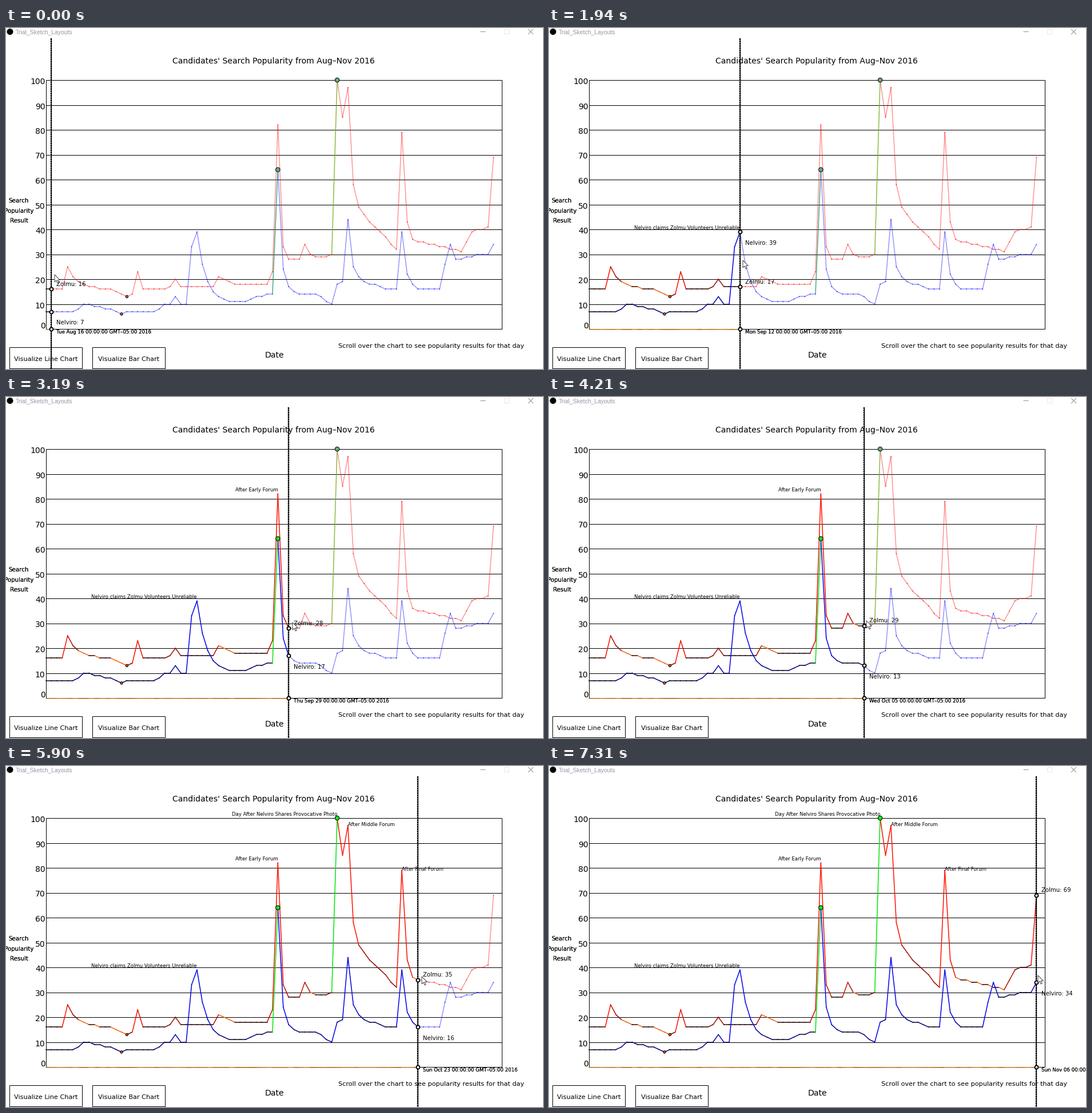
These frames come from a looping animation (939 px wide and 596 px high, 7630 ms). A matplotlib script:

```python
import numpy as np
import matplotlib.pyplot as plt
from matplotlib.animation import FuncAnimation
from matplotlib.collections import LineCollection
from matplotlib.patches import Circle, Polygon, Rectangle

W, H, DPI = 939, 596, 64
PT = 72 / DPI                      # points per pixel
FRAMES, INTERVAL = 218, 35
STEP_MS, LAST_STEP = 77.75, 94
LEFT, RIGHT, TOP, BASE = 70, 867, 91, 526
COUNT, DX, DY = 84, 9.427, 4.35
NAME_A, NAME_B = "Zolmu", "Nelviro"
days = np.arange(COUNT)
xs = LEFT + DX * days


def series(level, spikes):
    """Piecewise linear interest plus sudden spikes that decay by a rate."""
    v = np.interp(days, *zip(*level))
    for day, peak, *rate in spikes:
        decay = (rate[0] if rate else 0.0) ** np.arange(COUNT - day)
        v[day:] += (peak - v[day]) * decay
    return np.round(v).astype(int)


red_vals = series(
    [(0, 16), (12, 16), (15, 13), (18, 16), (28, 17), (41, 18), (43, 27.5),
     (53, 29.5), (57, 50), (65, 32), (69, 35), (77, 31), (79, 39), (82, 41)],
    [(4, 25, 0.6), (17, 23), (24, 20), (32, 21, 0.6), (43, 82, 0.1),
     (48, 34, 0.3), (54, 100), (55, 85), (56, 97, 0.15), (66, 79, 0.2),
     (83, 69)])
blue_vals = series(
    [(5, 7), (7, 10), (14, 7), (20, 7), (22, 10), (35, 10), (43, 15),
     (50, 14), (53, 10), (54, 18), (58, 20), (63, 16), (73, 16), (74, 26),
     (80, 30)],
    [(14, 6), (24, 13), (27, 33), (28, 39, 0.56), (43, 64, 0.195),
     (56, 44, 0.2), (66, 39, 0.27), (75, 34, 0.1), (83, 34)])
red_y, blue_y = BASE - DY * red_vals, BASE - DY * blue_vals

PATH = [(0, 85, 431), (2, 86, 432), (16, 241, 419), (25, 339, 406),
        (41, 501, 394), (49, 555, 393), (54, 555, 391), (76, 727, 368),
        (83, 802, 367), (92, 855, 366)]
path_n, path_x, path_y = zip(*PATH)

plt.rcParams["font.family"] = "DejaVu Sans"
fig = plt.figure(figsize=(W / DPI, H / DPI), dpi=DPI, facecolor="white")
ax = fig.add_axes([0, 0, 1, 1])
ax.set_xlim(0, W)
ax.set_ylim(H, 0)
ax.axis("off")


def label(x, y, text, size, ha="left", color="black", z=6, **kw):
    return ax.text(x, y, text, fontsize=size * PT, ha=ha, va="baseline",
                   color=color, zorder=z, **kw)


def box(x0, y0, x1, y1, color="black"):
    ax.add_patch(Rectangle((x0, y0), x1 - x0, y1 - y0, fill=False, ec=color,
                           lw=PT, zorder=2))


def lines(segs, color="black", width=1.0, z=2, **kw):
    return ax.add_collection(LineCollection(
        segs, colors=color, linewidths=width * PT, zorder=z, **kw),
        autolim=False)


def dots(x, y, size, face, edge="none", width=0.0, z=5):
    return ax.scatter(x, y, s=(np.array(size) * PT) ** 2, c=face,
                      edgecolors=edge, linewidths=width * PT, zorder=z)


def chain(y):
    pts = np.column_stack([xs, y])
    return np.stack([pts[:-1], pts[1:]], axis=1)


def draw_window():
    ax.add_patch(Circle((7, 6.5), 5.5, fc="black", lw=0))
    label(17, 11, "Trial_Sketch_Layouts", 10.4, color="#9c94a6",
          family="Liberation Sans")
    lines([[(829, 6), (838, 6)]], "#8f8f93")
    box(871, 2, 879, 10, "#f1e3ea")
    lines([[(913, 2), (922, 11)], [(913, 11), (922, 2)]], "#8f8f93")


def draw_chart():
    label(468, 62, "Candidates' Search Popularity from Aug\u2013Nov 2016",
          14.03, "center")
    label(469, 576, "Date", 14, "center")
    label(581, 559, "Scroll over the chart to see popularity results "
          "for that day", 11.2)
    for word, y in (("Search", 305), ("Popularity", 323), ("Result", 340)):
        for _ in range(2):
            label(22.5, y, word, 10.3, "center")
    for x, kind in ((6, "Line"), (151, "Bar")):
        box(x, 558, x + 127, 595)
        label(x + 63.5, 582, f"Visualize {kind} Chart", 11.2, "center")
    box(LEFT, TOP, RIGHT, BASE)
    levels = np.arange(0, 101, 10)
    lines([[(LEFT, BASE - DY * v), (RIGHT, BASE - DY * v)] for v in levels])
    for v in levels:
        y = BASE - DY * v + 7 if v else 525
        label(68.5, y, str(v), 14, "right")


def trail_colors(vals, hue, reach):
    """Opaque colours: near black when flat, full hue on steep changes."""
    power = np.minimum(1, np.sqrt(np.abs(np.diff(vals)) / reach))
    level = (30 + 225 * power) / 255
    out = np.ones((COUNT - 1, 4))
    out[:, :3] = level[:, None] * np.array(hue)
    return out


draw_window()
draw_chart()

# Extremes: two peaks, then two lows
ext_idx = np.array([blue_vals.argmax(), red_vals.argmax(),
                    blue_vals.argmin(), red_vals.argmin()])
ext_y = [blue_y.max(), red_y.max()]
ext_y = [blue_y.min(), red_y.min()] + ext_y
ext_on = np.repeat([(0.05, 0.9, 0.1), (0.9, 0.3, 0.1)], 2, axis=0)
ext_off = np.repeat([(0.39, 0.67, 0.51), (0.78, 0.35, 0.42)], 2, axis=0)
extremes = dots(xs[ext_idx], ext_y, [7.5, 7.5, 4.4, 4.4], ext_off, "black", 1, 4)

# The climb to each peak is green, gentle red falls are orange
GREEN = (0, 0.9, 0.05, 1)
blue_climb, red_climb = ext_idx[:2] - 1
red_on = trail_colors(red_vals, (1, 0.06, 0), 9)
red_on[np.diff(red_vals) == -1] = (0.93, 0.4, 0.08, 1)
red_on[red_climb] = GREEN
blue_on = trail_colors(blue_vals, (0, 0, 0.92), 5)
blue_on[blue_climb] = GREEN
red_off = np.tile((1, 0, 0, 0.42), (COUNT - 1, 1))
red_off[red_climb] = (0.48, 0.68, 0.12, 0.85)
blue_off = np.tile((0, 0, 1, 0.42), (COUNT - 1, 1))
blue_off[blue_climb] = (0.1, 0.58, 0.4, 0.8)

rng = np.random.default_rng(16)
mix = rng.random((COUNT - 1, 1))
base_on = (1 - mix) * (0.95, 0.66, 0.36, 1) + mix * (0.8, 0.5, 0.12, 1)
base_off = np.zeros((COUNT - 1, 4))

dots(xs, red_y, 1.7, "#f04848", z=2.5)
dots(xs, blue_y, 1.7, "#5050f0", z=2.5)
trails = [(lines(chain(y), "black", 1.5, 3, capstyle="round"), on, off)
          for y, on, off in ((red_y, red_on, red_off),
                             (blue_y, blue_on, blue_off),
                             (np.full(COUNT, BASE + 0.5), base_on, base_off))]

events = []
for day, y, ha, text in (
        (28, blue_y[28] - 4, "right",
         f"{NAME_B} claims {NAME_A} Volunteers Unreliable"),
        (43, red_y[43] - 4, "right", "After Early Forum"),
        (54, red_y[54] - 4, "right",
         f"Day After {NAME_B} Shares Provocative Photo"),
        (56, red_y[56] + 1, "left", "After Middle Forum"),
        (66, red_y[66] + 1, "left", "After Final Forum")):
    events.append((day, label(xs[day], y, text, 8.5, ha)))

ruler, = ax.plot([0, 0], [18, H], color="black", lw=2.4 * PT, zorder=7,
                 ls=(0, (1.25, 0.4)), dash_capstyle="butt")
core, = ax.plot([0, 0], [18, H], color="black", lw=PT, zorder=7)
rings = dots([0] * 3, [0] * 3, 6, "white", "black", 1.9, 8)
tag_a = label(0, 0, "", 10.1, z=9)
tag_b = label(0, 0, "", 10.1, z=9)
stamps = [label(0, 534, "", 8.6, z=9) for _ in range(2)]

ARROW = np.array([(0, 0), (0, 13), (3, 10.2), (5.2, 15), (7.2, 14.1),
                  (5.1, 9.6), (9.4, 9.6)])
pointer = ax.add_patch(Polygon(ARROW, closed=True, fc="white", ec="#333333",
                               lw=0.9 * PT, zorder=10))


def day_text(i):
    day = 15 + i
    for month, length in (("Aug", 31), ("Sep", 30), ("Oct", 31), ("Nov", 30)):
        if day <= length:
            break
        day -= length
    week = ("Mon", "Tue", "Wed", "Thu", "Fri", "Sat", "Sun")[i % 7]
    return f"{week} {month} {day:02d} 00:00:00 GMT\u201305:00 2016"


def update(frame):
    step = min(LAST_STEP, int((frame * INTERVAL + 30) / STEP_MS))
    px = round(np.interp(step, path_n, path_x))
    py = round(np.interp(step, path_n, path_y))
    i = min(COUNT - 1, int((px - 72) / DX))
    x = xs[i]

    passed = (days[:-1] < i)[:, None]
    for trail, on, off in trails:
        trail.set_color(np.where(passed, on, off))
    extremes.set_facecolor(np.where((ext_idx <= i)[:, None], ext_on, ext_off))
    for day, text in events:
        text.set_visible(day <= i)

    for line in (ruler, core):
        line.set_xdata([x, x])
    rings.set_offsets([(x, red_y[i]), (x, blue_y[i]), (x, BASE)])
    tag_a.set_position((x + 9, red_y[i] - 5.5))
    tag_a.set_text(f"{NAME_A}: {red_vals[i]}")
    tag_b.set_position((x + 9, blue_y[i] + 22.5))
    tag_b.set_text(f"{NAME_B}: {blue_vals[i]}")
    for stamp in stamps:
        stamp.set_x(x + 9)
        stamp.set_text(day_text(i))
    pointer.set_xy(ARROW + (px, py))
    return []


anim = FuncAnimation(fig, update, frames=FRAMES, interval=INTERVAL,
                     repeat=True, repeat_delay=0, blit=False)
plt.show()
```
